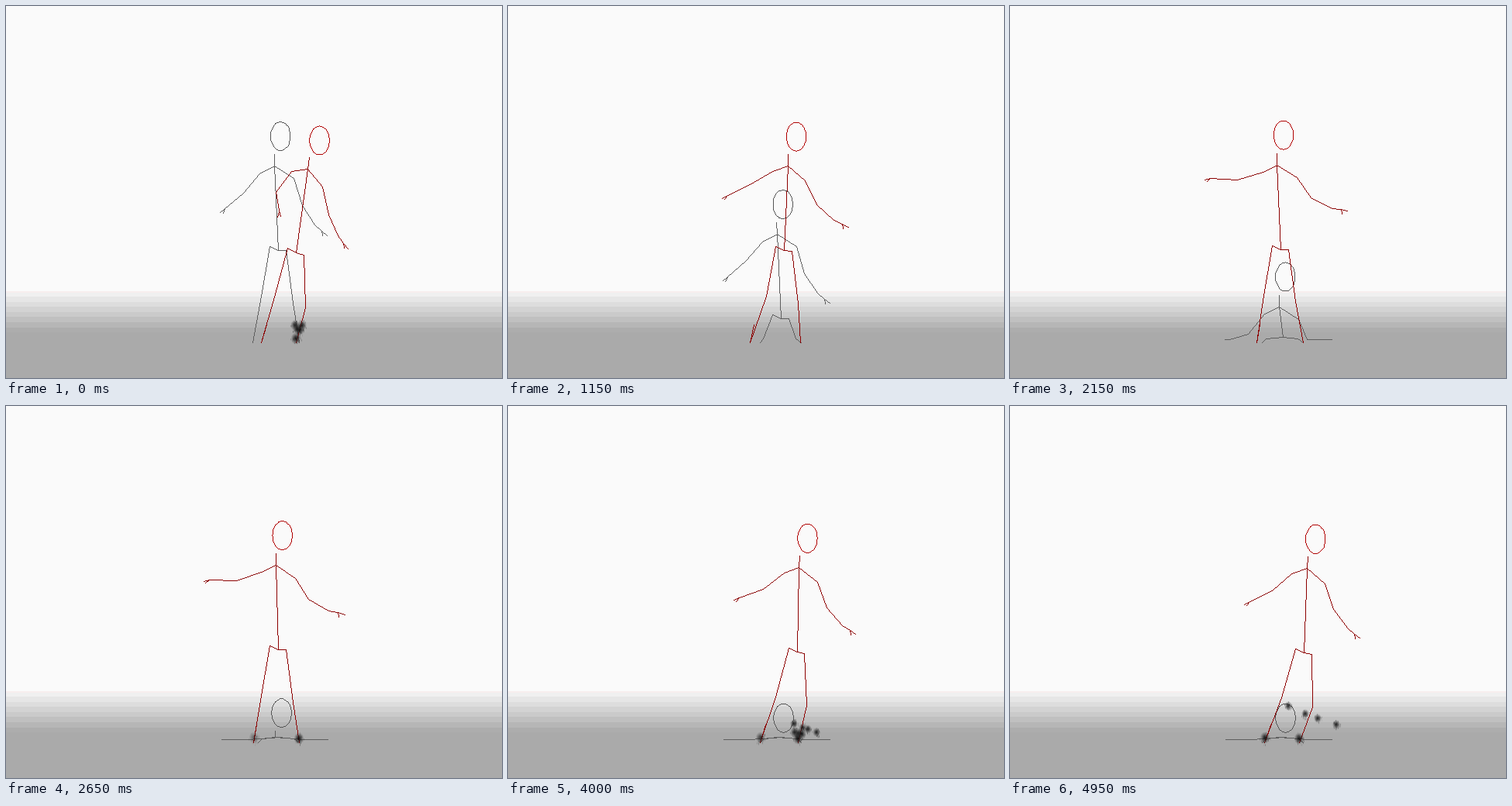
Recreate the animation shown at these times as an HTML page with a canvas. Size 640 px wide and 480 px high, loop 5000 ms.

```html
<!DOCTYPE html>
<html lang="en">
<head>
<meta charset="utf-8">
<title>Two stick figures</title>
<style>
html, body { margin: 0; width: 100%; height: 100%; overflow: hidden; background: #fafafa; }
canvas { display: block; }
</style>
</head>
<body>
<canvas id="stage" width="640" height="480"></canvas>
<script>
const ctx = document.getElementById('stage').getContext('2d');
const LOOP = 5000, STEP = 50, GROUND = 434;

// The red figure is driven by a few eased controls.
const TIMES = [0, 0.6, 1.7, 2.65, 3.5, 4.5, 4.95];
const CONTROLS = {
  shift: [1, 0.625, 0, 0.04, 0.67, 1.12, 1.2],
  lean: [1, 0.83, 0, 0, 0.22, 0.39, 0.39],
  right: [1, 0.77, 0, 0.04, 0.4, 0.65, 0.67],
  foot: [329, 313, 317, 319, 326, 325, 328]
};

const LIMBS = [
  'neck chest hip',
  'chest shoulderL elbowL wristL tipL', 'wristL thumbL',
  'chest shoulderR elbowR forearmR wristR tipR', 'wristR thumbR',
  'hip hipL kneeL footL toeL', 'hip hipR kneeR footR'
].map(s => s.split(' '));

const BURSTS = [
  { born: -0.8, end: 0.4, x: 377, y: 432, count: 4, angle: -100, fan: 8, speed: 26, size: 6 },
  { born: 0.3, end: 0.9, x: 331, y: 400, count: 1, angle: -90, fan: 0, speed: 20, size: 7 },
  { born: 3.15, end: 5, x: 378, y: 430, count: 4, angle: -114, fan: 30, speed: 26, size: 5 },
  { born: 3.2, end: 4.75, x: 376, y: 430, count: 3, angle: -125, fan: 30, speed: 13, size: 6 }
];

const mix = (a, b, u) => a + (b - a) * u;
const rad = deg => deg * Math.PI / 180;

function randomizer(seed) {
  return () => (seed = (seed * 16807) % 2147483647) / 2147483647;
}

function slope(v, i) {
  const n = TIMES.length - 1;
  const d = j => (v[j + 1] - v[j]) / (TIMES[j + 1] - TIMES[j]);
  if (i === 0) return d(0);
  if (i === n) return d(n - 1);
  const a = TIMES[i] - TIMES[i - 1], b = TIMES[i + 1] - TIMES[i];
  return (d(i - 1) * b + d(i) * a) / (a + b);
}

// Smooth curve through the key values.
function curve(v, t) {
  let i = 0;
  while (i < TIMES.length - 2 && t > TIMES[i + 1]) i++;
  const h = TIMES[i + 1] - TIMES[i], u = (t - TIMES[i]) / h, w = 1 - u;
  return w * w * (1 + 2 * u) * v[i] + u * u * (3 - 2 * u) * v[i + 1] +
    h * u * w * (w * slope(v, i) - u * slope(v, i + 1));
}

// Builds all joints outwards from the hip; angles in degrees, 90 is down.
function buildPose({ shift, lean, left, upper, right, foot }) {
  const p = { hip: [350 + 24 * shift, 314 + 3.5 * shift] };
  const bone = (name, parent, angle, length) => {
    const [x, y] = p[parent];
    p[name] = [x + length * Math.cos(rad(angle)), y + length * Math.sin(rad(angle))];
  };
  bone('chest', 'hip', mix(-91.6, -82, lean), 109);
  bone('neck', 'chest', mix(-90, -82, lean), 15);
  bone('head', 'chest', mix(-78, -68, lean), 39.5);

  bone('shoulderL', 'chest', mix(155, 171, lean), 21);
  bone('elbowL', 'shoulderL', mix(162, 130, upper), 33.5);
  bone('wristL', 'elbowL', mix(182, 81, left), mix(35, 25, left));
  bone('tipL', 'wristL', mix(166, 103, left), 8);
  bone('thumbL', 'wristL', mix(140, 79, left), 6.5);

  bone('shoulderR', 'chest', mix(34, 50, lean), 30);
  bone('elbowR', 'shoulderR', mix(56, 79, right), mix(32, 37, right));
  bone('forearmR', 'elbowR', mix(29, 66, right), 30);
  bone('wristR', 'forearmR', mix(6, 54, right), 12);
  bone('tipR', 'wristR', mix(18, 48, right), 9);
  bone('thumbR', 'wristR', 80, 6);

  bone('hipL', 'hip', 205, 12);
  bone('kneeL', 'hipL', mix(100, 105, shift), 65);
  bone('hipR', 'hip', mix(2, 18, lean), 10);
  bone('kneeR', 'hipR', mix(82, 88, shift), 68);
  p.footL = [foot, GROUND];
  p.footR = [378 - 4 * shift, GROUND];
  bone('toeL', 'footL', mix(-80, -73, shift), 24);
  return p;
}

function redPose(t) {
  const c = {};
  for (const name in CONTROLS) c[name] = curve(CONTROLS[name], t);
  c.left = Math.max(0, c.lean) ** 1.4;
  c.upper = c.right * 1.1;
  return buildPose(c);
}

// The grey figure sinks at a settling speed until each joint lies on the ground.
function greyPose(t) {
  const drop = 1 + 93.5 * (t - 0.21 * (1 - Math.exp(-t / 0.21)));
  const drift = Math.min(1.4, t / 2);
  const foot = 318 + 7 * Math.min(1, t / 0.9);
  const p = buildPose({ shift: 0.04, lean: -0.1, left: 0.42, upper: 1, right: 0.75, foot });
  p.toeL = p.footL;
  for (const name in p) {
    if (/foot|toe/.test(name)) continue;
    const [x, y] = p[name];
    const bump = 3 * Math.max(0, 1 - Math.abs(x - 349) / 30);
    const rest = name === 'head' ? 402 : 430 - bump;
    p[name] = [x + drift, Math.min(y + drop, rest)];
  }
  return p;
}

function line(a, b) {
  const x = Math.round(a[0]), y = Math.round(a[1]);
  const dx = Math.round(b[0]) - x, dy = Math.round(b[1]) - y;
  const n = Math.max(Math.abs(dx), Math.abs(dy), 1);
  for (let i = 0; i <= n; i++) {
    ctx.fillRect(Math.round(x + dx * i / n), Math.round(y + dy * i / n), 1, 1);
  }
}

function drawHead([x, y]) {
  const at = i => [x + 12.7 * Math.cos(rad(i * 7.5)), y + 18.5 * Math.sin(rad(i * 7.5))];
  for (let i = 0; i < 48; i++) line(at(i), at(i + 1));
}

function drawFigure(pose, color, headColor) {
  ctx.fillStyle = color;
  for (const limb of LIMBS) {
    for (let i = 1; i < limb.length; i++) line(pose[limb[i - 1]], pose[limb[i]]);
  }
  ctx.fillStyle = headColor;
  drawHead(pose.head);
}

function drawPuff(x, y, r, strength, seed) {
  const rnd = randomizer(seed);
  const glow = ctx.createRadialGradient(0, 0, 0, 0, 0, r);
  glow.addColorStop(0, `rgba(0,0,0,${strength})`);
  glow.addColorStop(0.35, `rgba(20,20,20,${strength * 0.75})`);
  glow.addColorStop(1, 'rgba(60,60,60,0)');
  ctx.save();
  ctx.translate(Math.round(x), Math.round(y));
  ctx.scale(1, 1.2);
  ctx.fillStyle = glow;
  ctx.fillRect(-r, -r, 2 * r, 2 * r);
  for (let i = 0; i < 26; i++) {
    const a = rnd() * 2 * Math.PI, d = r * mix(0.3, 1.1, rnd());
    ctx.fillStyle = `rgba(40,40,40,${strength * 0.35 * rnd()})`;
    ctx.fillRect(Math.round(d * Math.cos(a)), Math.round(d * Math.sin(a)), 1, 2);
  }
  ctx.restore();
}

function drawSmoke(t, pose) {
  const seed = 91 + Math.round(t * 20) * 31;
  BURSTS.forEach((b, k) => {
    if (t < b.born || t >= b.end) return;
    for (let i = 0; i < b.count; i++) {
      const way = b.speed * (0.8 + 0.2 * Math.cos(rad(i * 120))) * (t - b.born);
      const a = rad(b.angle + b.fan * i);
      drawPuff(b.x + way * Math.cos(a), b.y + way * Math.sin(a), b.size, 0.85, seed + k * 577 + i * 97);
    }
  });
  if (t < 0.35 || t > 2.4) drawPuff(pose.footR[0], GROUND - 5, 6.5, 0.9, seed + 4001);
  if (t > 2.4) drawPuff(pose.footL[0] + 1, GROUND - 6, 6.5, mix(0.4, 0.9, (t - 2.4) / 2.6), seed + 7001);
}

function drawBackground() {
  const band = (y, c) => { ctx.fillStyle = c; ctx.fillRect(0, y, 640, 480 - y); };
  band(0, '#fafafa');
  for (let i = 0; i < 9; i++) {
    const v = Math.max(170, Math.round(240 - 9.6 * i));
    band(Math.round(368.4 + 6.6 * i), `rgb(${v},${v},${v})`);
  }
  ctx.fillStyle = '#f7eeee';
  ctx.fillRect(0, 368, 640, 2);
}

function draw() {
  const t = Math.floor(performance.now() % LOOP / STEP) * STEP / 1000;
  const red = redPose(t);
  drawBackground();
  drawFigure(greyPose(t), '#5e5e5e', '#555555');
  drawFigure(red, '#8c0000', '#b00000');
  drawSmoke(t, red);
  requestAnimationFrame(draw);
}
draw();
</script>
</body>
</html>
```
